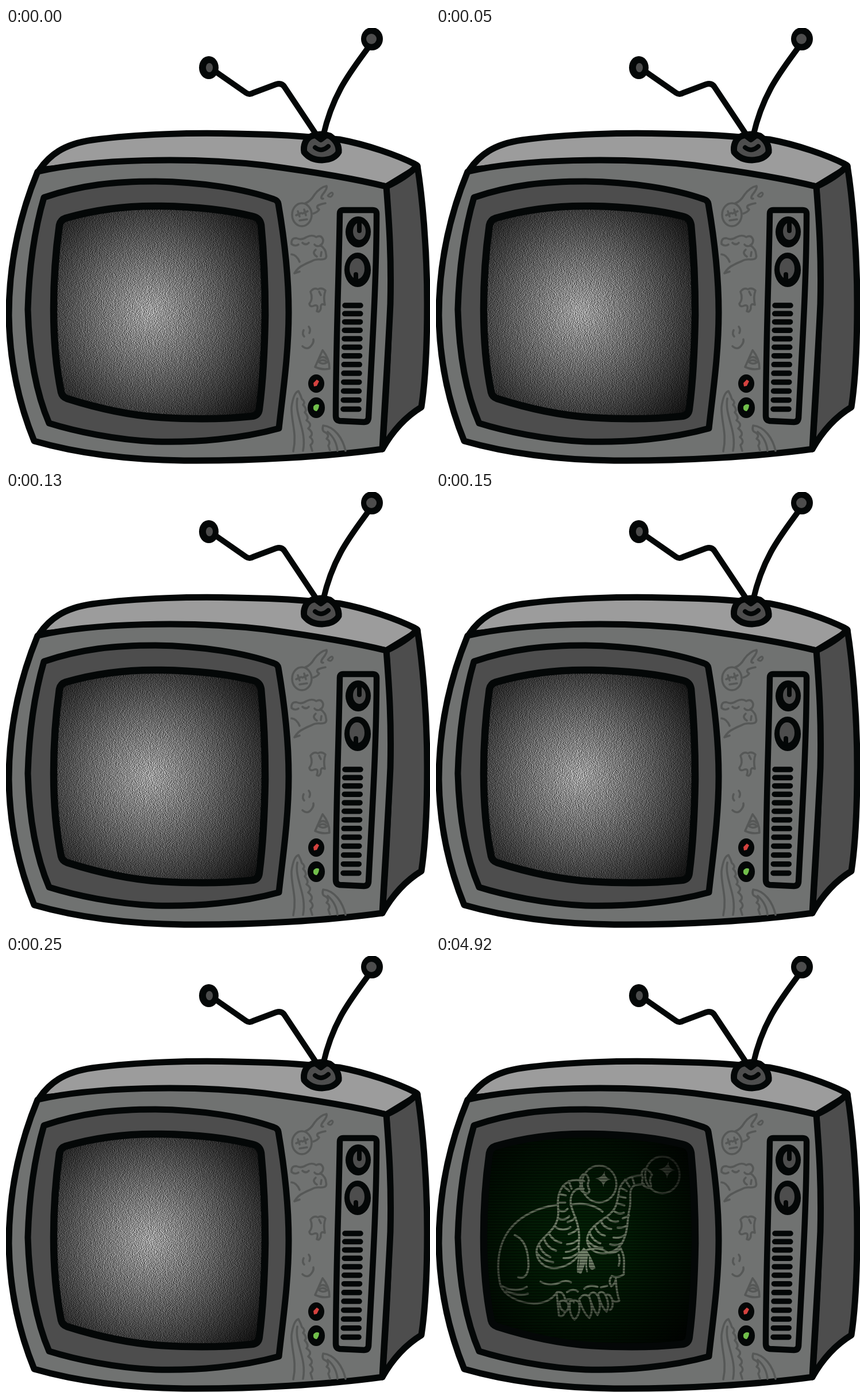
These frames come from a looping animation (738 by 759 pixels, 8 s). An HTML page with a canvas:

```html
<!DOCTYPE html>
<html lang="en">
<head>
<meta charset="utf-8">
<title>Television</title>
<style>
html, body { margin: 0; width: 100%; height: 100%; overflow: hidden; background: #fff; }
canvas { display: block; }
</style>
</head>
<body>
<canvas id="tv" width="738" height="759"></canvas>
<script>
const ctx = document.getElementById('tv').getContext('2d');
const INK = '#040707', FRONT = '#707271', DARK = '#4d4d4d', DECAL = '#565857', BONE = '#7c8d73';
const SCREEN = `M104 331 C155 316 210 309 270 310 C335 311 390 318 430 328 Q442 331 444 343
  C449 395 451 440 451 500 C450 560 447 615 441 662 Q440 675 427 676
  C380 681 320 681 270 678 C210 674 150 659 106 645 Q98 642 96 634
  C87 590 83 540 83 490 C83 430 87 385 93 343 Q95 334 104 331Z`;
const CX = 250, CY = 494;

function shape(d, fill, stroke = INK, width = 11) {
  const p = new Path2D(d);
  if (fill) { ctx.fillStyle = fill; ctx.fill(p); }
  if (stroke) { ctx.strokeStyle = stroke; ctx.lineWidth = width; ctx.stroke(p); }
}
const line = (d, color, width) => shape(d, null, color, width);

function oval(x, y, rx, ry, fill, stroke, width) {
  ctx.beginPath();
  ctx.ellipse(x, y, rx, ry, 0, 0, 7);
  if (fill) { ctx.fillStyle = fill; ctx.fill(); }
  if (stroke) { ctx.strokeStyle = stroke; ctx.lineWidth = width; ctx.stroke(); }
}

function glow(radius, ...stops) {
  const g = ctx.createRadialGradient(CX, CY, 0, CX, CY, radius);
  stops.forEach(([at, color]) => g.addColorStop(at, color));
  ctx.fillStyle = g;
  ctx.fillRect(80, 300, 380, 390);
}

// Differences of neighbouring random values give a fine, even grain.
function makeNoise(seed) {
  const c = document.createElement('canvas');
  c.width = 380; c.height = 390;
  const n = c.getContext('2d'), img = n.createImageData(380, 390);
  let last = 128;
  for (let i = 0; i < img.data.length; i += 4) {
    seed = (Math.imul(seed, 1664525) + 1013904223) >>> 0;
    const r = seed >>> 24;
    img.data.fill(158 + (r - last) * 0.65, i, i + 3);
    img.data[i + 3] = 255;
    last = r;
  }
  n.putImageData(img, 0, 0);
  return c;
}
const noise = [11, 5077, 90210].map(makeNoise);

function cabinet() {
  shape(`M58 247 C75 222 100 202 150 195 C230 184 330 182 400 184 C460 185 500 187 530 190
    L580 194 C628 203 680 221 712 237 Q717 239 716 243 L662 276 C540 252 350 215 58 247Z`, '#9c9c9c');
  shape(`M716 240 C724 290 733 380 733 480 C733 560 729 620 723 660 C700 674 676 696 655 733
    C664 600 673 480 662 276 Q696 260 716 240Z`, DARK);
  shape(`M55 250 C150 228 320 224 450 239 C540 251 610 263 662 276 C667 340 671 400 669 480
    C665 570 660 640 655 733 C560 746 430 754 310 753 C230 752 140 745 49 719
    C25 660 6 590 5 500 C5 420 20 335 55 250Z`, FRONT);
  shape(`M66 295 C130 273 190 267 260 267 C340 268 415 280 466 298 Q473 300 474 306
    C485 370 492 440 492 495 C492 570 481 640 475 697 C410 715 330 722 260 720
    C190 717 120 702 75 688 C50 630 40 560 38 490 C40 420 50 350 66 295Z`, DARK);
}

function decals() {
  const d = (path, w = 3.6) => line(path, DECAL, w);
  // comet
  oval(515, 325, 17, 20, null, DECAL, 3.6);
  d(`M508 319 L511 328 M505 326 L514 322 M519 316 L522 326 M516 323 L525 319 M511 335 L524 333
    M521 305 Q530 302 537 290 Q547 277 558 275 Q560 279 551 290 Q546 298 552 297
    M556 305 Q550 306 545 308 Q538 311 545 316 Q543 320 535 323`);
  d('M560 292 Q568 283 569 289 Q566 297 560 292Z', 3);
  // fist
  d(`M497 376 Q496 365 506 366 Q514 370 523 364 Q533 359 540 364 Q549 359 552 369 Q552 376 547 378
    Q557 385 557 394 Q560 403 548 403 Q538 402 532 406 Q524 409 517 413 Q508 417 502 427
    M497 376 Q503 381 509 377 M497 394 Q506 395 511 407 M516 374 Q522 379 527 374
    M537 377 Q541 382 549 378 M539 386 Q532 392 541 398 M549 390 L548 397 M502 427 L511 424`);
  // tooth
  d(`M530 459 Q536 451 543 455 Q549 451 556 457 Q552 468 555 482 Q547 478 548 488 Q546 496 541 493
    Q545 481 537 483 Q529 487 528 480 Q535 472 530 459Z M545 459 L548 465`);
  // smile
  d('M518 526 Q515 533 519 537 M527 520 Q531 525 528 531 M516 554 Q525 562 532 552 Q536 547 535 542');
  // pyramid
  d('M551 561 L538 590 Q551 596 563 593 Q563 575 551 561Z M546 575 Q552 570 558 576 M544 581 Q551 587 559 582 Q552 575 544 581');
  // tentacles
  d(`M497 660 C499 645 503 634 509 632 Q513 639 515 646 Q522 651 517 656 Q525 664 520 669
    Q528 678 523 683 Q534 690 526 697 Q537 706 529 712 Q538 720 530 726 L533 736
    M497 660 C496 685 507 705 500 737 M507 645 C502 675 524 700 517 736
    M552 692 Q549 702 556 704 Q564 709 558 715 Q566 720 561 727 L564 736
    M552 692 C572 694 586 714 591 736 M560 703 Q575 716 577 736`);
}

function controls() {
  shape(`M587 317 H638 Q645 317 645 323 C645 440 637 560 631 679 Q630 686 623 686 L581 684
    Q574 683 574 675 C574 560 579 440 581 323 Q581 317 587 317Z`, FRONT, INK, 10.5);
  oval(613, 355, 22, 27, INK);
  oval(615, 354, 11, 15, DARK);
  line('M615 341 L615 353', INK, 8);
  oval(612, 421, 23, 30, INK);
  oval(611, 419, 13, 18, DARK);
  line('M609 429 L609 438', INK, 8);
  for (let i = 0; i < 13; i++) {
    const y = 483 + i * 14.2 + i * i * 0.07, x = 590 - i / 4;
    line(`M${x} ${y} H${x + 27}`, INK, 9.5);
  }
  oval(540, 619, 14, 16, INK);
  shape('M535 618 L541 612 L545 615 L541 623 L536 624Z', '#d5423f', null);
  oval(540, 661, 15, 18, INK);
  shape('M535 659 Q539 653 545 656 Q545 662 541 667 Q534 667 535 659Z', '#71bf4b', null);
}

function antenna() {
  line('M362 74 L418 113 Q424 117 430 113 L470 98 Q480 95 485 103 L543 190', INK, 10);
  line('M632 32 C600 76 569 113 552 188', INK, 10);
  oval(353, 69, 17, 20, INK);
  oval(354, 69, 6, 8, DARK);
  oval(637, 19, 19, 20, INK);
  oval(636, 19, 9, 9, DARK);
  shape(`M532 188 C521 193 517 205 519 216 Q530 230 550 230 Q572 229 579 216
    C580 202 571 193 564 188 Q548 182 532 188Z`, DARK, INK, 11);
  line('M540 188 L548 194 L556 188', INK, 10);
  line('M538 208 Q549 217 561 206', INK, 8);
}

function sparkle(x, y, r) {
  ctx.save();
  ctx.translate(x, y);
  ctx.rotate(0.2);
  shape(`M0 ${-r} Q1 -2 ${r} -2 Q3 1 3 ${r} Q0 3 ${-r} 2 Q-2 -1 0 ${-r}Z`, BONE, null);
  ctx.restore();
}

function skull() {
  const b = (path, w = 3.6) => line(path, BONE, w);
  // cranium and jaw
  b(`M212 433 C171 438 137 458 121 487 C106 513 106 547 112 573 C119 592 145 604 170 605
    C188 605 201 599 210 586 M234 433 C255 429 275 433 290 445 M112 573 Q137 588 158 576
    M122 583 Q143 593 160 588 M137 486 C155 493 161 515 161 540 Q159 564 143 559
    M182 567 Q199 576 214 569 Q225 563 235 568 M210 586 L214 626 Q221 630 225 619
    M321 509 C331 524 326 541 327 554 Q316 562 306 557 Q299 566 305 575 Q312 571 313 562
    Q314 585 319 600 Q314 604 307 600 M318 520 Q321 530 318 539`);
  // teeth
  b(`M211 585 Q222 583 225 599 Q238 595 240 603 M215 602 Q223 596 230 605 Q232 617 225 619 Q215 617 215 602
    M233 602 Q242 595 249 604 Q252 624 241 633 Q231 624 233 602 M249 598 Q258 584 267 594
    Q275 618 267 630 Q258 624 249 598 M266 591 Q274 580 282 592 Q289 611 281 625 Q273 615 266 591
    M282 589 Q288 580 295 590 Q303 607 297 619 Q288 612 282 589 M296 590 Q302 586 307 599 Q309 613 303 616
    M228 585 Q239 578 247 584 M258 579 Q268 571 281 576 M287 577 L298 574`);
  // nose
  shape('M257 508 Q268 518 263 527 Q259 538 253 553 Q247 555 248 545 Q252 526 249 517Z', BONE, null);
  shape('M266 524 Q276 535 276 544 Q270 550 266 540Z', BONE, null);
  b('M250 518 Q246 535 247 550 M263 522 Q260 540 263 549 M257 509 Q267 518 276 543', 3);
  // left stalk
  b(`M258 392 C238 386 223 393 216 409 C207 430 218 446 209 465 C202 483 176 493 175 514
    C175 534 194 548 216 542 Q237 537 250 519 M257 405 C239 402 232 418 235 434
    C239 450 249 466 249 486 C250 498 246 508 250 519
    M231 392 L236 405 M221 400 L232 409 M214 414 L226 417 M212 429 L225 429 M214 443 Q224 447 229 440
    M213 457 Q224 462 232 453 M207 471 Q220 481 234 472 M243 455 Q236 462 229 463 M248 474 Q240 482 231 484
    M197 484 Q205 497 218 499 M188 492 Q193 508 209 513 M179 502 Q184 518 199 524 M176 517 Q186 531 204 533
    M249 493 Q240 501 228 502 M247 506 Q238 514 226 515 M246 518 Q235 527 222 526`);
  // right stalk
  b(`M358 382 C337 382 323 391 319 407 C315 428 316 440 298 453 C280 465 264 477 263 493
    C263 511 282 522 302 516 Q319 512 327 493 C336 472 332 457 337 440 C341 421 333 407 346 399 L362 397
    M341 384 L345 397 M329 389 L337 402 M320 403 L332 409 M318 418 L330 421 M316 431 L328 434
    M309 443 Q317 451 327 447 M297 454 Q305 465 317 462 M287 461 Q292 474 305 475 M276 469 Q281 484 294 487
    M267 480 Q272 496 286 500 M264 496 Q276 509 290 508 M336 452 L325 457 M333 469 Q325 474 316 473
    M330 485 Q320 492 309 490 M324 500 Q314 505 303 502`);
  b('M250 519 Q277 500 300 517 Q313 518 322 509');
  // eyeballs
  oval(284, 397, 30, 32, null, BONE, 3.6);
  oval(394, 381, 30, 32, null, BONE, 3.6);
  b(`M256 380 Q247 388 252 397 Q248 407 258 412 Q267 416 267 407 Q262 399 266 391 Q264 378 256 380
    M363 371 Q355 376 360 386 Q356 397 365 402 Q376 407 374 397 Q370 389 376 381 Q371 371 363 371`);
  sparkle(291, 388, 14);
  sparkle(402, 372, 15);
}

function screen(phase) {
  ctx.save();
  ctx.clip(new Path2D(SCREEN));
  if (phase < 3) {
    ctx.drawImage(noise[phase], 80, 300);
    glow(270, [0, 'rgba(0,0,0,0)'], [0.3, 'rgba(0,0,0,.28)'], [0.65, 'rgba(0,0,0,.62)'], [1, 'rgba(0,0,0,.95)']);
  } else {
    ctx.fillStyle = '#032206';
    ctx.fillRect(80, 300, 380, 390);
    skull();
    ctx.fillStyle = 'rgba(0,0,0,.42)';
    for (let y = 302; y < 690; y += 5) ctx.fillRect(80, y, 380, 2);
    glow(250, [0, 'rgba(0,0,0,0)'], [0.35, 'rgba(0,0,0,.22)'], [0.7, 'rgba(0,0,0,.6)'], [1, 'rgba(0,0,0,.92)']);
  }
  ctx.restore();
  line(SCREEN, INK, 12.5);
}

function draw(phase) {
  ctx.clearRect(0, 0, 738, 759);
  ctx.lineCap = ctx.lineJoin = 'round';
  cabinet();
  screen(phase);
  decals();
  controls();
  antenna();
}

let shown = -1;
function tick() {
  const t = performance.now() % 8000;
  const phase = t < 300 ? Math.floor(t / 50) % 3 : 3;
  if (phase !== shown) draw(shown = phase);
  requestAnimationFrame(tick);
}
tick();
</script>
</body>
</html>
```
